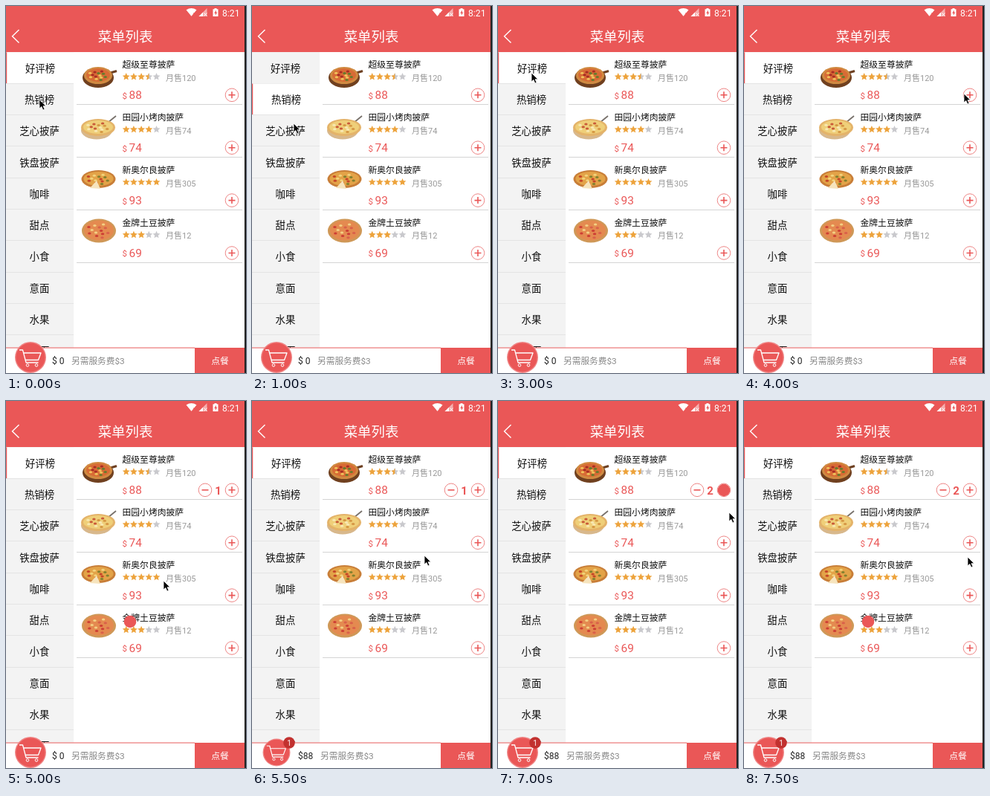
An HTML page for the animation above (8000 ms loop, 323 by 494 pixels).

```html
<!DOCTYPE html>
<html lang="zh-CN">
<head>
<meta charset="utf-8">
<style>
html, body { margin: 0; width: 100%; height: 100%; overflow: hidden; background: #fff; }
svg { display: block; width: 323px; height: 494px; font-family: Roboto, "Noto Sans CJK SC", "Noto Sans CJK", sans-serif; }
</style>
</head>
<body>
<svg id="stage" viewBox="0 0 323 494"></svg>
<script>
const RED = '#ea5757', STEP = 500, LOOP = 8000;
const menu = ['好评榜', '热销榜', '芝心披萨', '铁盘披萨', '咖啡', '甜点', '小食', '意面', '水果', '拌面'];
const dishes = [
  { name: '超级至尊披萨', stars: 3.5, sold: 120, price: 88 },
  { name: '田园小烤肉披萨', stars: 4, sold: 74, price: 74 },
  { name: '新奥尔良披萨', stars: 5, sold: 305, price: 93 },
  { name: '金牌土豆披萨', stars: 3, sold: 12, price: 69 }
];
// Selected category and pointer position, one entry per step
const selected = [0, 1, 1, 2, 3, 1];
const pointer = [
  [45, 126], [46, 130], [56, 158], [50, 180], [45, 216], [45, 132], [45, 90], [170, 104],
  [296, 118], [296, 119], [212, 242], [232, 208], [254, 173], [295, 119], [311, 150], [301, 210]
];
const flights = [4500, 7000], FLIGHT = 1000;

// y is the visual middle of the line
const text = (x, y, s, size, fill, anchor = 'start', weight = 400) =>
  `<text x="${x}" y="${y + size * .37}" font-size="${size}" fill="${fill}" text-anchor="${anchor}" font-weight="${weight}">${s}</text>`;
const rect = (x, y, w, h, fill) => `<rect x="${x}" y="${y}" width="${w}" height="${h}" fill="${fill}"/>`;
const oval = (x, y, rx, ry, fill) => `<ellipse cx="${x}" cy="${y}" rx="${rx}" ry="${ry}" fill="${fill}"/>`;
const dot = (x, y, r, fill) => oval(x, y, r, r, fill);
const line = (d, color, w, more = '') => `<path d="${d}" fill="none" stroke="${color}" stroke-width="${w}" ${more}/>`;
const shape = (d, fill, more = '') => `<path d="${d}" fill="${fill}" ${more}/>`;

function star(x, y, fill) {
  let d = '';
  for (let i = 0; i < 10; i++) {
    const r = i % 2 ? 2.4 : 5.2, a = i * Math.PI / 5;
    d += `${i ? 'L' : 'M'}${(x + r * Math.sin(a)).toFixed(2)} ${(y - r * Math.cos(a)).toFixed(2)}`;
  }
  return shape(d + 'z', fill);
}

function rating(x, y, score) {
  let out = '';
  for (let i = 0; i < 5; i++) {
    const cx = x + i * 10.2, part = Math.min(1, Math.max(0, score - i));
    out += star(cx, y, part === 1 ? '#eda33c' : '#c9c9cd');
    if (part === .5) out += `<g clip-path="inset(0 50% 0 0)">${star(cx, y, '#eda33c')}</g>`;
  }
  return out;
}

const button = (x, y, plus) =>
  `<circle cx="${x}" cy="${y}" r="8.8" fill="#fff" stroke="#ee8585"/>` +
  line(`M${x - 4.5} ${y}h9` + (plus ? `M${x} ${y - 4.5}v9` : ''), RED, 1.6);

function pizza(x, y, rx, ry, crust, top, spots) {
  let out = oval(x, y, rx, ry, crust) + oval(x, y - .5, rx - 3, ry - 2.5, top);
  for (let i = 0; i < 13; i++) {
    const a = i * 2.4, r = Math.sqrt((i + .5) / 13) * .8;
    out += oval(x + Math.cos(a) * r * (rx - 3), y + Math.sin(a) * r * (ry - 3), 2.2, 1.5, spots[i % spots.length]);
  }
  return out;
}

const photos =
  line('M137 91L149 87.5', '#6d4022', 3) + oval(124, 96.5, 21, 13.5, '#70401f') +
  pizza(124, 93.5, 19, 11.5, '#d08a41', '#d86b35', ['#f0c35c', '#a92d24', '#657c2c']) +
  line('M137 157L148 148', '#77706a', 1.8) + oval(122, 167.5, 21, 12, '#d8b88c') +
  pizza(124, 163.5, 23, 11.5, '#e4b369', '#efcf79', ['#f8e8b3', '#c95a39', '#d59643']) +
  pizza(124.5, 233, 23, 12, '#c87e38', '#e3a348', ['#c64528', '#f2d37c', '#82812f']) +
  shape('M122 235L113 245L127 246z', '#f6e4bd') +
  pizza(125, 302.5, 23, 16, '#cf9857', '#e48a50', ['#cd3e34', '#f3cf83', '#d9604a']);

const header = rect(0, 0, 323, 62, RED) +
  shape('M242.5 5.3Q249.5 .6 256.5 5.3L249.5 13.8z', '#fff') +
  line('M252.5 9.5l4 4m0-4l-4 4', RED, 1.2) +
  shape('M270.5 3V14H259.5z', '#f5b0b0') + shape('M265 8.5V14H259.5z', '#fff') +
  line('M266.5 9.5l4 4m0-4l-4 4', '#fff', 1) +
  shape('M280.5 3h3v1.2h2v9.8h-7v-9.8h2z', '#fff') + shape('M282.8 5.5l-2.6 4.2h1.6v3l2.5-4.2h-1.5z', RED) +
  text(291, 9, '8:21', 12.2, '#fff') +
  line('M17.5 32L8.5 40.8L17.5 49.6', '#fff', 1.4) +
  text(160.5, 41, '菜单列表', 18.4, '#fff', 'middle');

const dishList = dishes.map((d, i) => {
  const y = i * 70.9;
  return text(156.5, 78.5 + y, d.name, 11.8, '#111', 'start', 500) +
    rating(161.7, 95.3 + y, d.stars) +
    text(215, 96.7 + y, '月售' + d.sold, 11, '#999') +
    text(156.5, 120.5 + y, '$', 11.5, RED) + text(165.5, 119.7 + y, d.price, 15.4, RED) +
    button(304, 119.8 + y, true) +
    rect(95, Math.round(132.4 + y), 223, 1, '#d4d4d4');
}).join('');

function sidebar(active) {
  return rect(0, 62, 91, 398, '#f3f3f3') + menu.map((name, i) => {
    const y = 62.3 + i * 42.3, on = i === active;
    return (on ? rect(0, y, 91, 42.3, '#fff') + rect(0, y, 1.2, 42.3, RED) : '') +
      rect(0, Math.round(y + 41.6), 91, 1, '#e4e4e4') +
      text(on ? 46 : 45, y + 21.4, name, 13.4, '#111', 'middle', 500);
  }).join('');
}

function footer(total, scale) {
  return rect(0, 460, 323, 34, '#fff') + rect(0, 459.5, 254, 1.2, '#ec7777') +
    rect(254, 460, 67, 34, RED) + text(288, 477.5, '点餐', 11.8, '#fff', 'middle') +
    text(62, 477.5, total ? '$' + total : '$ 0', 12, '#222') +
    text(total ? 92 : 88, 477.5, '另需服务费$3', 11.7, '#888') +
    `<g transform="translate(33 473) scale(${scale})">` +
    dot(0, 0, 21, '#ef8585') + dot(0, 0, 19.6, RED) +
    line('M-15 -10h4.5L-6 7H10.5M-9.5 -6H14L10.5 3.5H-7', '#fff', 1.3, 'stroke-linejoin="round"') +
    `<g fill="none" stroke="#fff"><circle cx="-4" cy="10.5" r="1.8"/><circle cx="8" cy="10.5" r="1.8"/></g></g>` +
    (total ? dot(50, 460, 7.8, '#c2312f') + text(50, 460, '1', 10, '#fff', 'middle') : '');
}

const arrow = ([x, y]) =>
  shape('M0 0V12L2.8 9.4L4.9 14L7 13L5 8.7H8.8z', '#000', `stroke="#fff" stroke-width=".8" transform="translate(${x} ${y})"`);

function draw(t) {
  const step = t / STEP;
  const count = flights.filter(f => t >= f).length;
  const landed = t >= flights[0] + FLIGHT;
  const start = flights.find(f => t >= f && t < f + FLIGHT);
  let out = rect(0, 0, 323, 494, '#fff') + sidebar(selected[step] || 0) + dishList + photos;
  if (count) out += button(268, 119.8, false) + text(285.5, 120.5, count, 15, RED, 'middle', 700);
  out += header + footer(landed ? dishes[0].price : 0, t === flights[0] + FLIGHT ? .88 : 1);
  if (start !== undefined) {
    const p = (t - start) / FLIGHT;
    out += dot(304 - 274 * p, 120 + 354 * p, 8.3, RED);
  }
  out += rect(321, 0, 2, 494, '#222') + arrow(pointer[step]);
  stage.innerHTML = out;
}

const stage = document.getElementById('stage');
let shown = -1;
function tick() {
  const t = Math.floor(performance.now() % LOOP / STEP) * STEP;
  if (t !== shown) draw(shown = t);
  requestAnimationFrame(tick);
}
tick();
</script>
</body>
</html>
```
